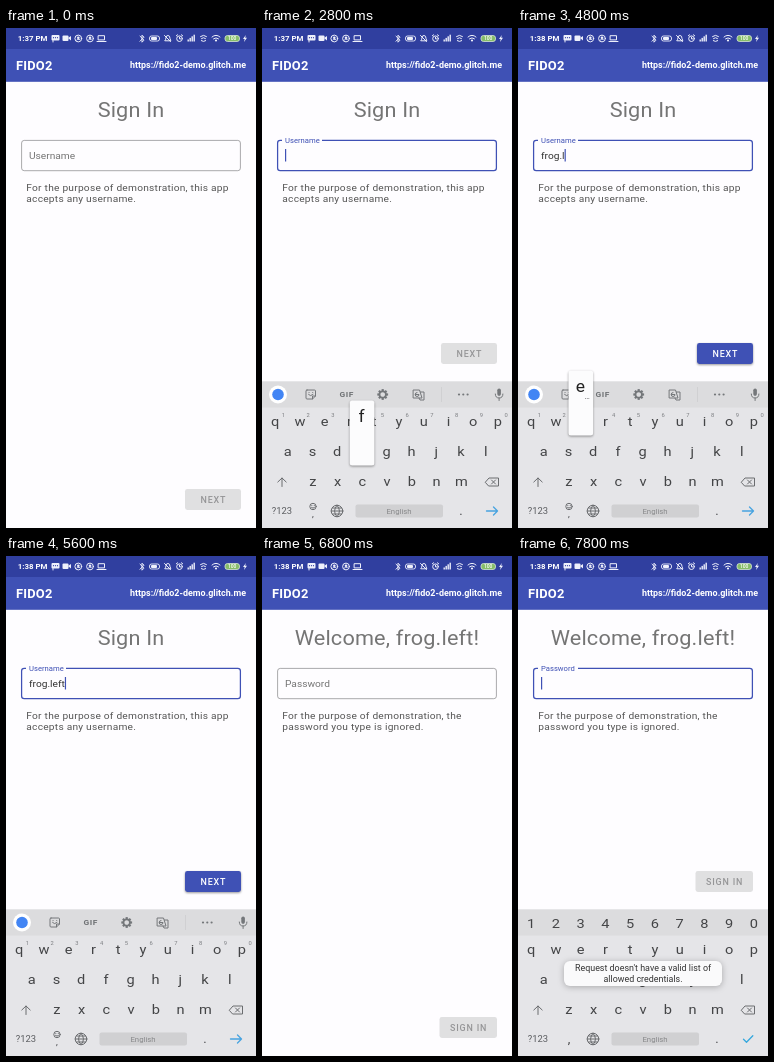
Animation, 250 px wide and 500 px high, one loop 8000 ms. Source, as an HTML page:

```html
<!DOCTYPE html>
<html lang="en">
<head>
<meta charset="utf-8">
<title>Sign-in demo</title>
<style>
  html, body { margin: 0; width: 100%; height: 100%; overflow: hidden; background: #fefdff; }
  svg { display: block; width: 100%; height: 100%; }
  text { font-family: Roboto, sans-serif; white-space: pre; }
  .line { fill: none; stroke: currentColor; stroke-width: 1; stroke-linecap: round; stroke-linejoin: round; }
  .lift { filter: drop-shadow(0 1px 1.2px #0006); }
  .float { filter: drop-shadow(0 1.5px 3px #0004); }
</style>
</head>
<body>
<svg id="stage" viewBox="0 0 250 500" preserveAspectRatio="none"></svg>
<script>
const LOOP = 8000, STEP = 200;
const BLUE = '#3f51b5', PAPER = '#fefdff', INK = '#434446', GREY = '#757575';
const USER = 'frog.left';
const COLUMN = 24.75;
const SQUEEZE = 0.923; // the screen is shown slightly flattened

const text = (x, y, size, str, { fill = INK, anchor = 'start', weight = 400, gap = 0, id = '' } = {}) =>
  `<text id="${id}" transform="translate(${x} ${y}) scale(1 ${SQUEEZE})" font-size="${size}" fill="${fill}"
    text-anchor="${anchor}" font-weight="${weight}" letter-spacing="${gap}">${str}</text>`;
const mid = (x, y, size, str, opts = {}) => text(x, y, size, str, { anchor: 'middle', ...opts });
const rect = (x, y, w, h, fill, r = 0, extra = '') =>
  `<rect x="${x}" y="${y}" width="${w}" height="${h}" rx="${r}" fill="${fill}" ${extra}/>`;
const circle = (x, y, r, fill) => `<circle cx="${x}" cy="${y}" r="${r}" fill="${fill}"/>`;
const ring = (x, y, r) => `<circle class="line" cx="${x}" cy="${y}" r="${r}"/>`;
const line = (d, extra = '') => `<path class="line" d="${d}" ${extra}/>`;
const group = (id, body, extra = '') => `<g id="${id}" ${extra}>${body}</g>`;
const at = (x, y, body) => `<g transform="translate(${x} ${y})">${body}</g>`;

// Letter rows: first key centre, row centre
const ROWS = [['qwertyuiop', 13.2, 394], ['asdfghjkl', 25.7, 424], ['zxcvbnm', 50.8, 454]];

function keyAt(char) {
  const [letters, x, y] = ROWS.find(row => row[0].includes(char));
  return { x: x + letters.indexOf(char) * COLUMN, y };
}

function statusBar() {
  const badge = x => ring(x, 11, 3.4) + circle(x, 10.3, 1.3, 'currentColor') + line(`M${x - 1.5} 12.5l1-1 1 1 1-1`);
  const notices =
    rect(45.5, 7.5, 8, 5.5, 'currentColor', 1) + line('M47 13v1.5') +
    [47.5, 49.5, 51.5].map(x => circle(x, 10.2, .6, '#303f9f')).join('') +
    rect(56.5, 8, 6, 5.5, 'currentColor', 1) + '<path d="M62 10.5l3-2v4.5z" fill="currentColor"/>' +
    badge(72.3) + badge(84) +
    line('M92.5 8.2h6v4.2h-6zM91 14h9');
  const signals =
    line('M134 8.7l4 4-2 2v-7l2 2-4 4') +
    rect(143.5, 8.5, 10, 5, 'none', 2, 'stroke="currentColor"') + rect(145, 9.5, 6, 3, 'currentColor', 1) +
    line('M159 13q1-1 1-3 0-2 2-2 2 0 2 3l.7 2zM158.5 8l6 6') +
    ring(173.5, 11.2, 2.8) + line('M173.5 9.7v1.7h1.2M170.3 8.3l1.3-1M176.7 8.3l-1.3-1') +
    [0, 1, 2, 3].map(i => rect(181.5 + i * 2, 12 - i * 1.6, 1.4, 2 + i * 1.6, 'currentColor')).join('') +
    line('M194.5 9q3-2.5 6 0M195.5 11q2-1.7 4 0M195.3 13.2q2.2 1.6 4.4 0') +
    line('M206 9.5q4-3.5 8 0M207.5 11.3q2.5-2 5 0') + circle(210, 13, 1.1, 'currentColor') +
    rect(219, 8, 14.5, 6, '#86bd69', 2.5, 'stroke="#d7e5d4" stroke-width=".8"') +
    mid(226.2, 12.8, 5, '100', { fill: '#fff', weight: 500 }) +
    '<path d="M239.8 7.5l-2.8 4h1.7l-.7 3 3-4.2h-1.8z" fill="currentColor"/>';
  return rect(0, 0, 250, 21, '#303f9f') + text(11.7, 13.3, 7.9, '', { fill: '#fff', weight: 600, id: 'clock' }) +
    `<g color="#eef0fb" stroke-width=".9" transform="translate(0 -.5)">${notices}${signals}</g>`;
}

function appBar() {
  return rect(0, 21, 250, 32.8, BLUE) +
    text(10, 41.8, 12.9, 'FIDO2', { fill: '#fff', weight: 600, gap: .2 }) +
    text(240, 40, 8.95, 'https://fido2-demo.glitch.me', { fill: '#fff', weight: 700, anchor: 'end' });
}

function form() {
  return mid(125, 89, 21.7, '', { fill: GREY, gap: .16, id: 'title' }) +
    rect(15.6, 112.4, 218.8, 30.3, 'none', 2.6, 'id="outline"') +
    rect(20, 110, 40, 5, PAPER, 0, 'id="notch"') +
    text(0, 0, 10.2, '', { id: 'label' }) +
    text(23, 131, 10.2, '', { fill: '#333', id: 'typed' }) +
    rect(23, 121, 1.2, 12.5, BLUE, 0, 'id="cursor"') +
    text(20.3, 162.6, 10.2, '', { fill: '#555', gap: .24, id: 'note1' }) +
    text(20.3, 173.7, 10.2, '', { fill: '#555', gap: .24, id: 'note2' });
}

function button() {
  return group('button', rect(179, 0, 56, 21, '#e0e0e0', 2.4, 'id="face"') +
    mid(207.4, 13.7, 8.93, '', { weight: 500, gap: .85, id: 'action' }));
}

function toolbar() {
  const teeth = Array.from({ length: 8 }, (_, i) =>
    `<rect x="-1.1" y="-5.4" width="2.2" height="2.6" transform="rotate(${i * 45})" fill="currentColor"/>`).join('');
  return circle(16, 366.5, 9, '#fff') + circle(16, 366.5, 5.8, '#4285f4') +
    `<g color="#74777a">` +
    line('M45 362h7.5q1 0 1 1v5l-3 3h-5.5q-1 0-1-1v-7q0-1 1-1zM53.5 368h-3v3M46.5 366.5q2 2.5 4.5 0M47 364.5h.1M50.7 364.5h.1') +
    mid(84.6, 369.3, 8.4, 'GIF', { fill: '#6f7275', weight: 700, gap: .5 }) +
    at(120.7, 366.5, teeth + '<circle class="line" r="3.2" style="stroke-width:1.8"/>') +
    line('M151.5 362h6l2.5 8h-8.5zM158.5 364h3.5v8h-4l-1-2M153.500 366.500h3.500q0 2-2 2-1.800 0-1.800-2t1.800-2') +
    [197, 201.3, 205.6].map(x => circle(x, 366.5, 1.1, 'currentColor')).join('') +
    rect(235.3, 360.5, 3.6, 7.4, 'currentColor', 1.8) + line('M233.3 366q0 4 3.8 4t3.8-4M237.1 370v2.5') +
    `</g>` + rect(179, 359, .6, 15, '#c8c8ca');
}

function keyboard() {
  const digits = '1234567890';
  const eachDigit = draw => [...digits].map((d, i) => draw(d, ROWS[0][1] + i * COLUMN)).join('');
  const letters = ROWS.map(([row, x, y]) => [...row].map((c, i) =>
    mid(x + i * COLUMN, y + 4.4, 14.6, c)).join('')).join('');
  const bottom =
    mid(20, 486.1, 9.4, '?123', { fill: '#5a5c5f' }) +
    line('M20 458.5v-8.500M15.800 454l4.200-4 4.200 4') +
    line('M223.5 454l3.5-4h9.5v8h-9.5zM229.5 452l4 4M233.5 452l-4 4') +
    ring(75, 483, 5.8) + line('M69.2 483h11.6M70.5 480h9M70.5 486h9M75 477.2q-5 5.8 0 11.6q5-5.8 0-11.6') +
    rect(93.5, 476.5, 87.5, 13, '#d0d0d2', 2) + mid(137, 485.6, 7.8, 'English', { fill: '#88898b' }) +
    mid(199, 486.5, 13, '.');
  const plain = toolbar() +
    eachDigit((d, x) => mid(x + 8.2, 389, 5.8, d, { fill: '#7b7d80' })) +
    ring(51, 478.5, 3.2) + line('M49.5 479.5q1.5 1.5 3 0M49.8 477.5h.1M52.2 477.5h.1') + mid(51, 489, 9, ',') +
    line('M224.5 483h11M231.5 479l4 4-4 4', 'style="stroke:#47a3e0;stroke-width:1.3"');
  const secret = eachDigit((d, x) => mid(x, 371.8, 14.6, d)) + mid(51, 486.5, 13, ',') +
    line('M225.5 483.2l3 3 6.3-6.5', 'style="stroke:#35a8de;stroke-width:1.3"');
  return group('keyboard',
    rect(0, 353.5, 250, 150, '#e5e5e8') + rect(0, 353.5, 250, 26, '#dcdcde') +
    letters + `<g color="#6a6c6f">${bottom}${group('plain', plain)}${group('secret', secret)}</g>` +
    group('popup', rect(-12.2, -51.5, 24.6, 65, '#fcfcfd', 2.5, 'class="lift"') +
      mid(-.3, -30.5, 17.5, '', { fill: '#222', id: 'popped' }) +
      mid(6.5, -23, 8, '…', { id: 'more' })));
}

function toast() {
  return group('toast', rect(46, 405, 158, 25, '#fafafb', 6, 'class="float"') +
    mid(125, 415.3, 8.93, 'Request doesn\'t have a valid list of', { fill: '#333' }) +
    mid(125, 425.6, 8.93, 'allowed credentials.', { fill: '#333' }));
}

document.getElementById('stage').innerHTML =
  rect(0, 0, 250, 500, PAPER) + form() + button() + statusBar() + appBar() + keyboard() + toast();

const $ = Object.fromEntries([...document.querySelectorAll('[id]')].map(el => [el.id, el]));
const attr = (el, values) => { for (const k in values) el.setAttribute(k, values[k]); };
const show = (el, on) => el.setAttribute('visibility', on ? 'inherit' : 'hidden');

// Last value whose start time has passed
const pick = (t, ...stops) => stops.filter(([start]) => t >= start).pop()[1];

function render(t) {
  const second = t >= 6000;
  const focused = second ? t >= 7000 : t >= 1800;
  const floated = second ? t >= 7200 : t >= 2000;
  const count = second ? 0 : pick(t, [0, 0], [3000, 1], [3400, 2], [4200, 3], [4400, 4],
    [4600, 5], [4800, 6], [5000, 7], [5200, 8], [5400, 9]);
  const key = pick(t, [0, ''], [2800, 'f'], [3000, ''], [3200, 'r'], [3400, ''], [4000, 'o'], [4200, ''],
    [4800, 'e'], [5000, ''], [5200, 't'], [5400, '']);
  const drop = pick(t, [0, 150], [2000, 75], [2200, 0], [6600, 75], [6800, 150], [7200, 75], [7400, 0]);

  $.clock.textContent = t < 4000 ? '1:37 PM' : '1:38 PM';
  $.title.textContent = second ? `Welcome, ${USER}!` : 'Sign In';
  $.note1.textContent = 'For the purpose of demonstration, ' + (second ? 'the' : 'this app');
  $.note2.textContent = second ? 'password you type is ignored.' : 'accepts any username.';

  attr($.outline, { stroke: focused ? BLUE : '#8e8e90', 'stroke-width': focused ? 1.25 : .75 });
  show($.notch, focused);
  $.label.textContent = second ? 'Password' : 'Username';
  attr($.label, {
    transform: `translate(23 ${floated ? 115.4 : 131}) scale(1 ${SQUEEZE})`,
    'font-size': floated ? 7.65 : 10.2,
    fill: floated ? BLUE : GREY
  });
  $.typed.textContent = USER.slice(0, count);
  show($.cursor, focused);
  attr($.cursor, { x: 23 + (count ? $.typed.getComputedTextLength() : 0) });

  const pressed = t >= 5800;
  attr($.button, { transform: `translate(0 ${drop < 75 ? 315 : 461})`, class: count ? 'lift' : '' });
  attr($.face, {
    x: second ? 177.5 : 179, width: second ? 57.5 : 56,
    fill: count ? (pressed ? '#6574c4' : BLUE) : '#e0e0e1'
  });
  $.action.textContent = second ? 'SIGN IN' : 'NEXT';
  attr($.action, { fill: count ? '#fff' : '#959597',
    transform: `translate(${second ? 206.6 : 207.4} 13.7) scale(1 ${SQUEEZE})` });

  show($.keyboard, drop < 150);
  attr($.keyboard, { transform: `translate(0 ${drop})` });
  show($.plain, t < 7000);
  show($.secret, t >= 7000);
  show($.popup, key);
  if (key) {
    const { x, y } = keyAt(key);
    attr($.popup, { transform: `translate(${x} ${y})` });
    $.popped.textContent = key;
  }
  show($.more, 'eo'.includes(key) && key);
  attr($.toast, { opacity: pick(t, [0, 0], [7600, .5], [7800, 1]) });
}

const start = performance.now();
let shown = -1;
function tick() {
  const t = (performance.now() - start) % LOOP;
  const step = Math.floor(t / STEP);
  if (step !== shown) render((shown = step) * STEP);
  requestAnimationFrame(tick);
}
tick();
</script>
</body>
</html>
```
